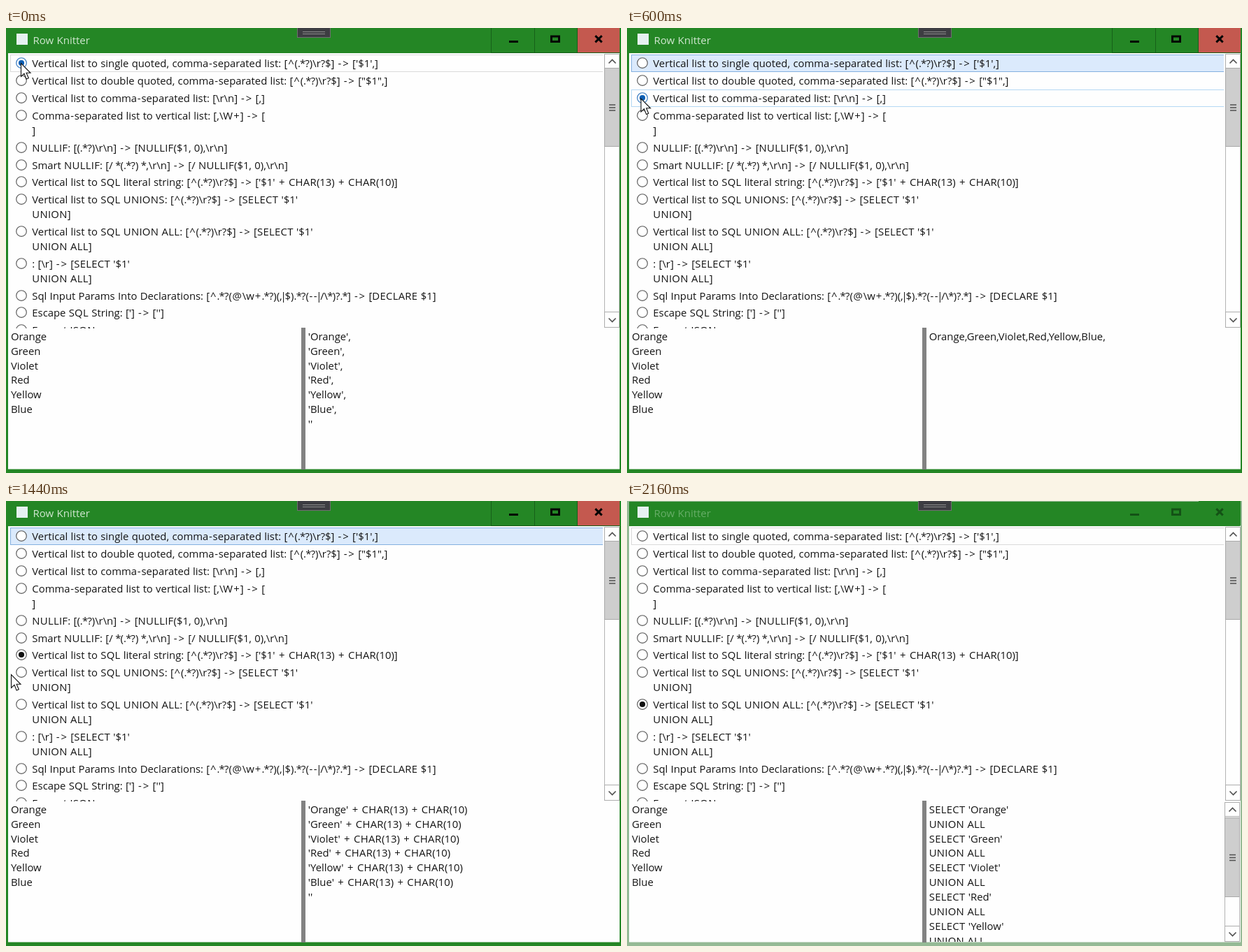
These frames come from a looping animation (879x637 px, 2.4 s). An HTML page:

```html
<!DOCTYPE html>
<html lang="en">
<head>
<meta charset="utf-8">
<title>Row Knitter</title>
<style>
  html, body { margin: 0; width: 100%; height: 100%; overflow: hidden; }
  #stage {
    position: relative; width: 879px; height: 637px; overflow: hidden;
    font: 14.85px/20.9px "Open Sans", "Noto Sans", sans-serif;
    word-spacing: .43px; color: #141414; background: #248625;
    --edge: #248625; --ink: #050505; --title: #cfe6cf; --close: #c4594f;
  }
  #stage.inactive { --edge: #95ba95; --ink: #145216; --title: #66ad67; --close: #248625; }
  svg { position: absolute; left: 0; top: 0; overflow: visible; }
  #stage > div, .row, .label { position: absolute; white-space: pre; }
  #title { left: 38.5px; top: 6.6px; color: var(--title); font-size: 15px; }
  #list { left: 4px; top: 37px; width: 850px; height: 392.5px; overflow: hidden; }
  #input, #output { top: 430.7px; height: 200.3px; overflow: hidden; }
  #input { left: 7px; width: 410px; }
  #output { left: 431.7px; width: 420px; }
  .row { left: 2px; width: 847px; box-sizing: border-box; border: 1px solid transparent; border-right: 0; }
  .row.hover { border-color: #b4d8f4; }
  .row.idle { border-color: #dadada; }
  .row.selected { border-color: #84b0e0; background: #dbeafc; }
  .label { left: 30.3px; top: .8px; }
  .caps { letter-spacing: .3px; }
  .row svg { left: 15px; top: 11.2px; }
  .ring { fill: #fff; stroke: #585858; stroke-width: 1.15; }
  .dot { fill: #111; display: none; }
  .checked .dot { display: inline; }
  .hot .ring { stroke: #2d74bd; }
  .hot .dot { fill: #0e5fb4; }
  .edge { fill: var(--edge); }
  .glyph { fill: none; stroke: var(--ink); stroke-width: 3; }
  .inactive .split { display: none; }
  .track { fill: #fefefe; stroke: #b4b4b4; }
  .button { fill: #fefefe; stroke: #adadad; }
  .thumb { fill: #cecece; stroke: #a9a9a9; }
  .mark { fill: none; stroke: #505050; stroke-width: 1.6; }
  [hidden] { display: none; }
</style>
</head>
<body>
<div id="stage">
  <svg width="879" height="637">
    <path class="edge" d="M0 0H3V637H0ZM876 0H879V637H876ZM0 631H879V637H0ZM0 0H879V1H0Z"/>
    <rect x="3" y="36" width="874" height="595.5" fill="#fefefe"/>
    <rect x="15" y="8" width="16" height="16" fill="#e6f1f1"/>
    <rect x="817" width="60" height="35" style="fill:var(--close)"/>
    <path class="split" d="M693.5 0V35.5H877M755.5 0V35M816.5 0V35" fill="none" stroke="#17601a"/>
    <path class="glyph" d="M719 19.5H732"/>
    <path class="glyph" d="M779.5 12H790.5V19.5H779.5Z"/>
    <path class="glyph" d="M842.3 11.2L851.7 20.3M851.7 11.2L842.3 20.3"/>
    <rect x="416.5" y="-1" width="47" height="14.5" fill="#3d3d42" stroke="#707070"/>
    <path d="M424 5.5H456M424 8.5H456" stroke="#8c8c8c"/>
    <rect x="422" y="429" width="6" height="203" fill="#828282"/>
    <g id="listBar"></g>
    <g id="outBar"></g>
  </svg>
  <div id="title">Row Knitter</div>
  <div id="list"></div>
  <div id="input"></div>
  <div id="output"></div>
  <svg width="879" height="637">
    <path id="arrow" d="M0 0V19L4.5 14.8L7.6 22.6L10.8 21.3L7.6 13.8H13.5Z" fill="#fff" stroke="#111" stroke-width="1.1"/>
    <path id="beam" d="M-6 -11H-2L0 -10L2 -11H6M-6 11H-2L0 10L2 11H6M0 -10V10" fill="none" stroke="#111" stroke-width="2"/>
  </svg>
</div>
<script>
const $ = id => document.getElementById(id);
const PITCH = 24.87, LINE = 20.85, STEP = 120, LOOP = 2400;

const labels = [
  String.raw`Vertical list to single quoted, comma-separated list: [^(.*?)\r?$] -> ['$1',]`,
  String.raw`Vertical list to double quoted, comma-separated list: [^(.*?)\r?$] -> ["$1",]`,
  String.raw`Vertical list to comma-separated list: [\r\n] -> [,]`,
  String.raw`Comma-separated list to vertical list: [,\W+] -> [` + "\n]",
  String.raw`NULLIF: [(.*?)\r\n] -> [NULLIF($1, 0),\r\n]`,
  String.raw`Smart NULLIF: [/ *(.*?) *,\r\n] -> [/ NULLIF($1, 0),\r\n]`,
  String.raw`Vertical list to SQL literal string: [^(.*?)\r?$] -> ['$1' + CHAR(13) + CHAR(10)]`,
  String.raw`Vertical list to SQL UNIONS: [^(.*?)\r?$] -> [SELECT '$1'` + "\nUNION]",
  String.raw`Vertical list to SQL UNION ALL: [^(.*?)\r?$] -> [SELECT '$1'` + "\nUNION ALL]",
  String.raw`: [\r] -> [SELECT '$1'` + "\nUNION ALL]",
  String.raw`Sql Input Params Into Declarations: [^.*?(@\w+.*?)(,|$).*?(--|/\*)?.*] -> [DECLARE $1]`,
  "Escape SQL String: ['] -> ['']",
  "Format JSON"
];

const colors = ["Orange", "Green", "Violet", "Red", "Yellow", "Blue"];
const each = f => colors.map(f).join("\n");
const results = {
  0: each(c => `'${c}',`) + "\n''",
  1: each(c => `"${c}",`) + '\n""',
  2: colors.join(",") + ",",
  3: each(c => c),
  6: each(c => `'${c}' + CHAR(13) + CHAR(10)`) + "\n''",
  8: each(c => `SELECT '${c}'\nUNION ALL`)
};

// Symbol side bearings of the interface font; its capitals also run wider
const bearing = { "*": -.8, "|": -2.2, "^": 1.1, ">": 1.1, "+": 1.1, "-": .75, "@": .8 };
const spaced = text => text.replace(/[*|^>+@-]|[A-Z]{2,}/g, s => s in bearing
  ? `<span style="margin:0 ${bearing[s]}px">${s}</span>`
  : `<span class="caps">${s}</span>`);

let rowTop = 1.4;
const rows = labels.map(text => {
  const row = document.createElement("div");
  const height = PITCH + (text.includes("\n") ? LINE : 0);
  const y = Math.round(rowTop);
  rowTop += height;
  row.style.top = y + "px";
  row.style.height = Math.round(rowTop) - y + "px";
  row.innerHTML = `<svg width="1" height="1"><circle class="ring" r="7.3"/><circle class="dot" r="4.1"/></svg>` +
    `<span class="label">${spaced(text)}</span>`;
  $("list").append(row);
  return row;
});
$("input").textContent = each(c => c);

function scrollBar(x, top, bottom, thumbTop, thumbBottom) {
  const box = (name, y1, y2) =>
    `<rect class="${name}" x="${x + .5}" y="${y1 + .5}" width="21" height="${y2 - y1 - 1}"/>`;
  const chevron = (y, d) => `<path class="mark" d="M${x + 6.5} ${y - 2.5 * d}l5 ${5 * d}l5 ${-5 * d}"/>`;
  const mid = (thumbTop + thumbBottom) / 2 + .5;
  const grip = [-4, 0, 4].map(d => `M${x + 7} ${mid + d}h9`).join("");
  return box("track", top, bottom) +
    box("button", top, top + 21) + chevron(top + 11, -1) +
    box("button", bottom - 23, bottom) + chevron(bottom - 11, 1) +
    box("thumb", thumbTop, thumbBottom) + `<path class="mark" d="${grip}"/>`;
}
$("listBar").innerHTML = scrollBar(855, 37, 429, 57, 170);
$("outBar").innerHTML = scrollBar(854, 431, 631, 453, 567);

// One pose per step: checked row, hovered row, pointer x, y, pointer kind
const poses = [
  [0, 0, 21.5, 50.5, "hot"],
  [0, 1, 22, 66, "arrow"],
  [1, 1, 21, 75, "hot"],
  [1, 1, 0, 0, "hidden"],
  [1, 2, 20, 92, "arrow"],
  [2, 2, 20, 101, "hot"],
  [3, 3, 18, 124, "hot"],
  [3, 3, -4, 132, "arrow"],
  [3, 4, 2, 162, "arrow"],
  [3, 5, 8, 188, "arrow"],
  [3, 5, 11.5, 207, "arrow"],
  [6, 6, 19, 221, "hot"],
  [6, -1, 7.5, 248.5, "arrow"],
  [6, 7, 14, 266, "arrow"],
  [8, 8, 19, 290, "hot"],
  [8, 9, 80, 342, "arrow"],
  [8, 11, 553, 477, "beam"],
  [8, -1, 0, 0, "none"],
  [8, -1, 0, 0, "none"]
];

function show(step) {
  const [checked, hover, x, y, kind] = poses[step];
  const inactive = step === poses.length - 1;
  const hot = kind === "hot" || kind === "hidden";
  $("stage").className = inactive ? "inactive" : "";
  rows.forEach((row, i) => {
    let name = "row";
    if (i === 0) name += step === 0 || inactive ? " idle" : " selected";
    else if (i === hover) name += " hover";
    if (i === checked) name += hot ? " checked hot" : " checked";
    row.className = name;
  });
  $("output").innerHTML = spaced(results[checked]);
  $("outBar").toggleAttribute("hidden", checked !== 8);
  $("arrow").toggleAttribute("hidden", kind !== "arrow" && kind !== "hot");
  $("beam").toggleAttribute("hidden", kind !== "beam");
  for (const id of ["arrow", "beam"]) $(id).setAttribute("transform", `translate(${x} ${y})`);
}

const start = performance.now();
let last = -1;
function tick() {
  const t = (performance.now() - start) % LOOP;
  const step = Math.min(Math.floor(t / STEP), poses.length - 1);
  if (step !== last) show(last = step);
  requestAnimationFrame(tick);
}
tick();
</script>
</body>
</html>
```
